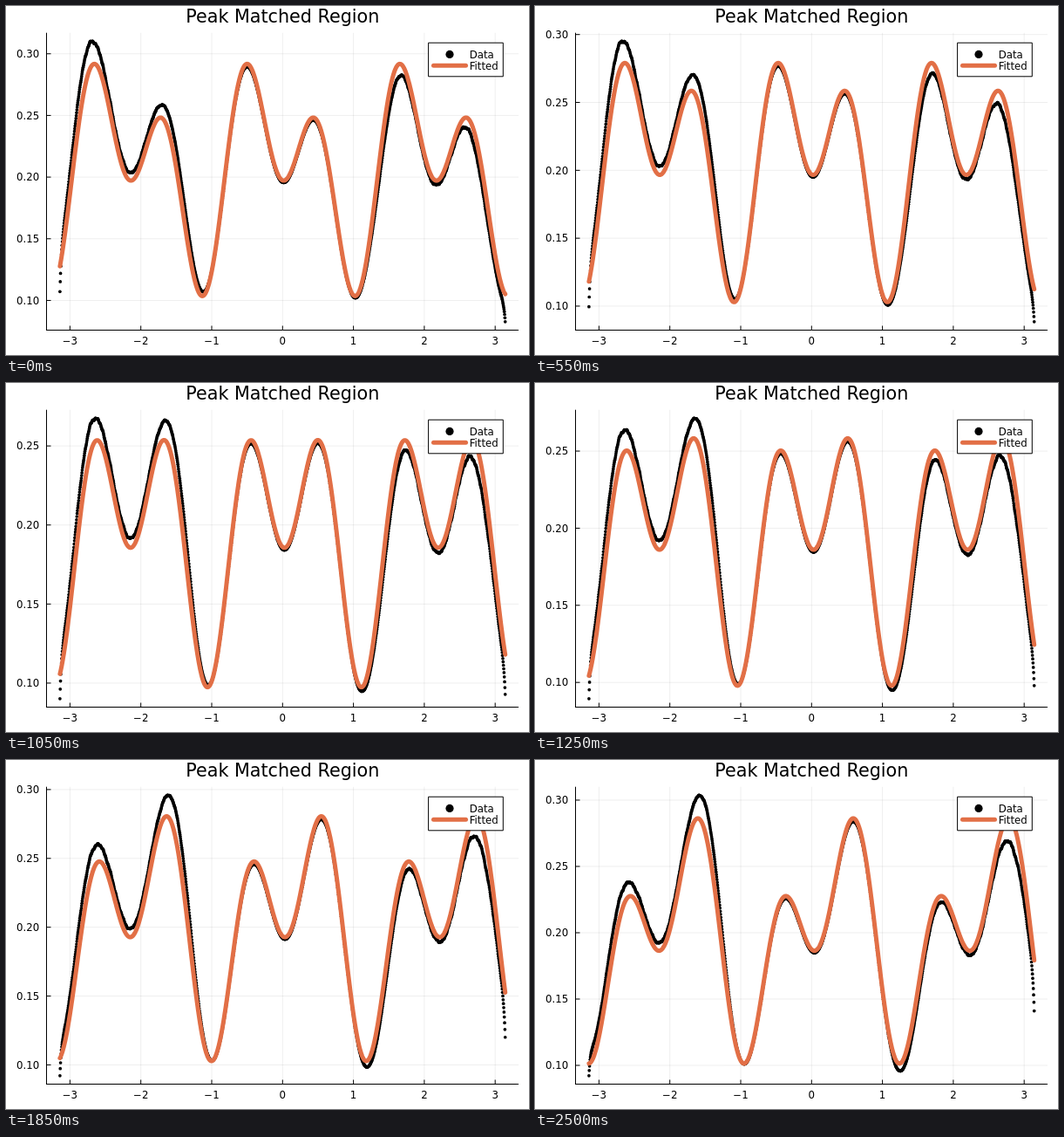
These frames come from a looping animation (600x400 px, 2.55 s). An HTML page with a canvas:

```html
<!DOCTYPE html>
<html lang="en">
<head>
<meta charset="utf-8">
<title>Peak Matched Region</title>
<style>
  html, body { margin: 0; width: 600px; height: 400px; overflow: hidden; background: #fff; }
  canvas { display: block; }
</style>
</head>
<body>
<canvas id="plot" width="600" height="400"></canvas>
<script>
const ctx = document.getElementById('plot').getContext('2d');
const LOOP = 2550, STEP = 50, COUNT = 1500;
const LEFT = 46.5, RIGHT = 588, TOP = 30.7, BOTTOM = 371.5;
const ORANGE = '#e26f46', GRID = 'rgba(0,0,0,.065)';

// Mean signal level at a few times
const LEVELS = [[0, .2083], [550, .207], [800, .1946], [1250, .1959], [1850, .204], [2250, .1994], [2500, .1993]];

const lerp = (a, b, k) => a + (b - a) * k;
const clamp = v => Math.max(0, Math.min(1, v));
const toX = x => 317.3 + 81.3 * x;

function levelAt(time) {
  const i = Math.max(1, LEVELS.findIndex(([t]) => t >= time));
  const [t0, v0] = LEVELS[i - 1], [t1, v1] = LEVELS[i];
  return lerp(v0, v1, (time - t0) / (t1 - t0));
}

// Two harmonics whose skew drifts steadily
function fittedCurve(time) {
  const p = time / 2500;
  const level = levelAt(time);
  const first = .226 - .105 * (p - .38) ** 2;
  const second = .2755 - .07 * (p - .4) ** 2;
  const skew = .067 - .16 * p;
  const omega = lerp(2.915, 2.865, p), origin = lerp(.016, .04, p);
  return x => {
    const a = omega * (x - origin);
    return level * (1 + first * Math.cos(a) - second * Math.cos(2 * a)
      + skew * (Math.sin(2 * a) - 2 * Math.sin(a)));
  };
}

// Measured / fitted: high on the left, low on the right, falling off at both ends
function dataRatio(x, p) {
  const r = Math.abs(x), edge = Math.PI - r, isLeft = x < 0;
  const onset = clamp((r - .85) / .5);
  const ripple = Math.cos(2.025 * (r - 1.35)) ** 6;
  const bias = (isLeft ? .04 + .06 * ripple : -.01 - .05 * ripple) * onset * onset * (3 - 2 * onset);
  const shoulder = (isLeft ? .05 : -.05) * Math.exp(-edge / .1);
  const drop = (isLeft ? .27 - .07 * p * p : .12) * Math.exp(-edge / .018);
  const noise = (Math.sin(41 * x) + Math.sin(67 * x + 1) + Math.sin(173 * x)) * .0015 * clamp(x * x / 5);
  return .992 + bias + shoulder - drop + noise;
}

const xs = Array.from({ length: COUNT }, (_, i) => lerp(-Math.PI, Math.PI, i / (COUNT - 1)));

function line(x1, y1, x2, y2, color, width = 1) {
  ctx.strokeStyle = color;
  ctx.lineWidth = width;
  ctx.beginPath();
  ctx.moveTo(x1, y1);
  ctx.lineTo(x2, y2);
  ctx.stroke();
}

function dot(x, y, r) {
  ctx.beginPath();
  ctx.arc(x, y, r, 0, 2 * Math.PI);
  ctx.fill();
}

function text(str, x, y, align, size = 11.75) {
  ctx.font = `${size}px "DejaVu Sans", sans-serif`;
  ctx.textAlign = align;
  ctx.fillText(str, x, y);
}

function drawAxes(toY) {
  ctx.lineCap = 'butt';
  for (let v = -3; v <= 3; v++) {
    const x = toX(v);
    line(x, TOP, x, BOTTOM, GRID);
    line(x, BOTTOM, x, BOTTOM - 5, '#000');
    text(String(v).replace('-', '\u2212'), x, 387.6, 'center');
  }
  for (let i = 1; i <= 7; i++) {
    const v = i * .05, y = toY(v);
    if (y < TOP - .5 || y > BOTTOM) continue;
    line(LEFT, y, RIGHT, y, GRID);
    line(LEFT, y, LEFT + 5, y, '#000');
    text(v.toFixed(2), 38.2, y + 4.3, 'right');
  }
  line(LEFT, TOP, LEFT, BOTTOM + .5, '#000');
  line(LEFT, BOTTOM, RIGHT, BOTTOM, '#000');
  text('Peak Matched Region', 317.3, 18.7, 'center', 20.7);
}

function drawLegend() {
  ctx.fillStyle = '#fff';
  ctx.strokeStyle = '#000';
  ctx.lineWidth = 1;
  ctx.beginPath();
  ctx.rect(485, 42.2, 85.3, 38.6);
  ctx.fill();
  ctx.stroke();
  ctx.fillStyle = '#000';
  dot(509, 55.4, 4.6);
  line(490.5, 68.3, 527.5, 68.3, ORANGE, 5);
  text('Data', 531.7, 59.7, 'left');
  text('Fitted', 531.7, 72.6, 'left');
}

function draw(time) {
  const fitted = xs.map(fittedCurve(time));
  const data = xs.map((x, i) => fitted[i] * dataRatio(x, time / 2500));

  // The vertical axis follows the data with a 3% margin
  const low = Math.min(...data, ...fitted), high = Math.max(...data, ...fitted);
  const toY = v => lerp(BOTTOM, TOP, ((v - low) / (high - low) + .03) / 1.06);

  ctx.fillStyle = '#fff';
  ctx.fillRect(0, 0, 600, 400);
  ctx.fillStyle = '#000';
  drawAxes(toY);
  xs.forEach((x, i) => dot(toX(x), toY(data[i]), 1.85));

  ctx.strokeStyle = ORANGE;
  ctx.lineWidth = 5;
  ctx.lineCap = ctx.lineJoin = 'round';
  ctx.beginPath();
  xs.forEach((x, i) => ctx.lineTo(toX(x), toY(fitted[i])));
  ctx.stroke();
  drawLegend();
}

function tick() {
  draw(Math.floor(performance.now() % LOOP / STEP) * STEP);
  requestAnimationFrame(tick);
}
tick();
</script>
</body>
</html>
```
